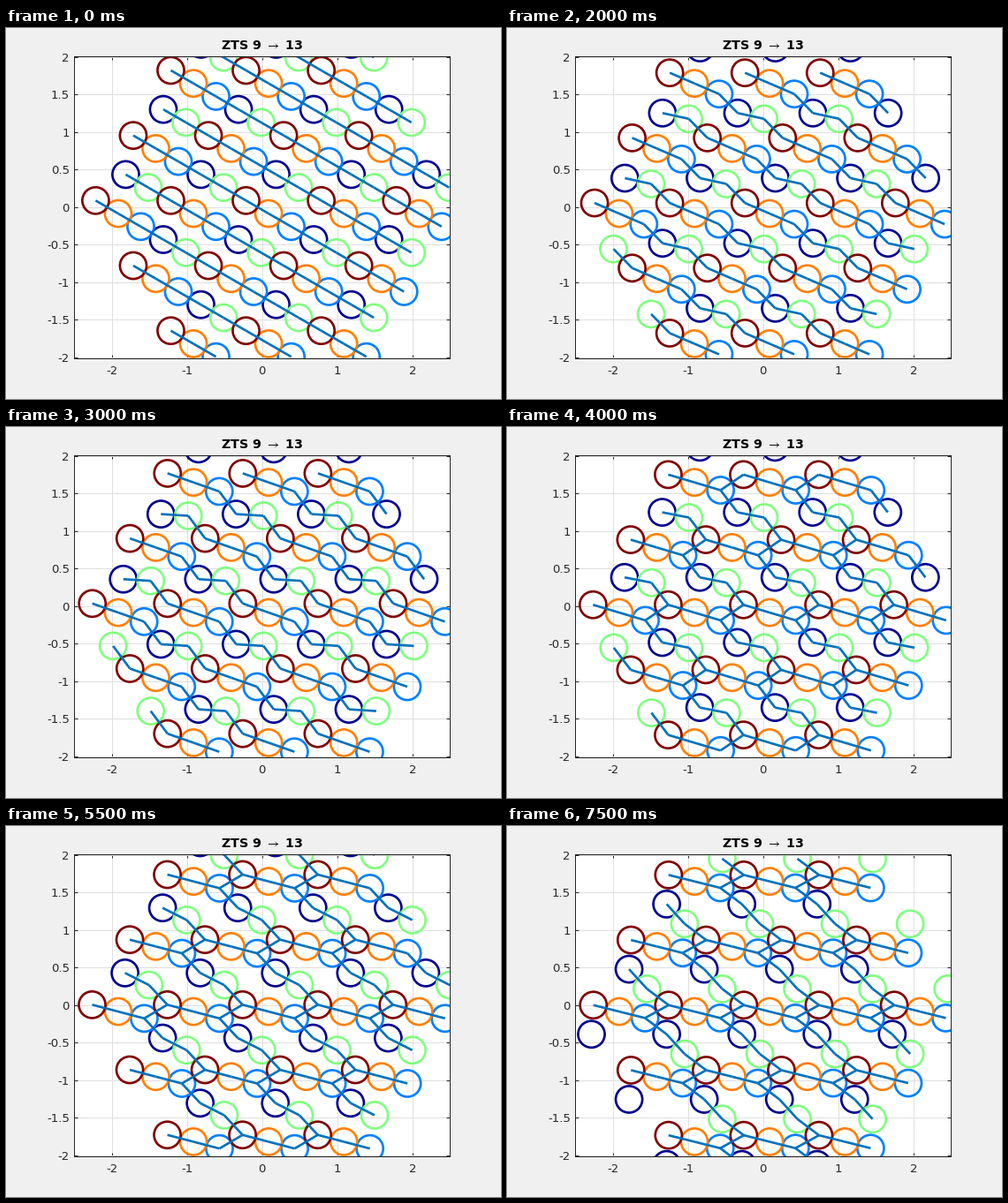
Animation, 560 px wide and 420 px high, one loop 8000 ms. Source, as a matplotlib script:

```python
import numpy as np
import matplotlib.pyplot as plt
from matplotlib.animation import FuncAnimation
from matplotlib.collections import EllipseCollection, LineCollection

plt.rcParams["font.family"] = "DejaVu Sans"
plt.rcParams["mathtext.fontset"] = "stix"

W, H, DPI = 560, 420, 100
FRAMES, STEP = 16, 500
PX = 72 / DPI            # points per pixel
LEFT, RIGHT, TOP, BOTTOM = 77.0, 502.4, 31.6, 373.8
UNIT = (RIGHT - LEFT) / 5
DIAMETER, REACH = 0.354, 0.38
DARK = "#262626"
NAVY, BLUE, GREEN, ORANGE, RED = "#00008f", "#0080ff", "#80ff80", "#ff8000", "#800000"
COLORS = [NAVY, BLUE, GREEN, ORANGE, RED]

# Lattice vectors, the hexagonal patch of 19 cells and the neighbouring images.
A1, A2 = np.array([1, 0]), np.array([0.5, np.sqrt(0.75)])
CELLS = np.array([i * A1 + j * A2
                  for j in range(-2, 3) for i in range(-2, 3) if abs(i + j) <= 2])
NEAR = np.array([i * A1 + j * A2 for i in range(-2, 3) for j in range(-2, 3)])

# Each cell holds a rod of three particles and a pair, both turning on fixed pivots.
SHIFT = np.array([-0.0132, 0])
ROD = np.array([0.1, -A2[1] / 10]) + SHIFT
PAIR = np.array([0.85, -0.6 * A2[1]]) + SHIFT


def heading(degrees):
    a = np.radians(degrees)
    return np.array([np.cos(a), np.sin(a)])


def wrap(p):
    """Periodic image of p closest to the cell centre."""
    images = p + NEAR
    return images[np.argmin(np.hypot(*images.T))]


def particles(t):
    """Particle positions at t seconds, one array per colour."""
    gap = np.interp(t, [0, 1, 3.2, 5, 7.5], [0.3464, 0.349, 0.366, 0.359, 0.354])
    rod = gap * heading(-14 - 16 * np.exp(-(t / 2.835) ** 1.74))
    # The pair swings up until it hits the rod, then turns back.
    pair = gap / 2 * heading(np.interp(t, [0, 3.15, 7.5], [-30, -2.2, -47.7]))
    basis = [PAIR - pair, ROD + rod, PAIR + pair, ROD, ROD - rod]
    return [CELLS + wrap(p) for p in basis]


def bonds(points):
    dist = np.linalg.norm(points[:, None] - points[None], axis=2)
    i, j = np.where(np.triu(dist < REACH, 1))
    return np.stack([points[i], points[j]], axis=1)


fig = plt.figure(figsize=(W / DPI, H / DPI), dpi=DPI, facecolor="#f0f0f0")
ax = fig.add_axes([LEFT / W, 1 - BOTTOM / H, (RIGHT - LEFT) / W, (BOTTOM - TOP) / H])
y_max = (BOTTOM - TOP) / UNIT / 2
ax.set_xlim(-2.5, 2.5)
ax.set_ylim(-y_max, y_max)
ax.set_axisbelow(True)
ax.grid(color="#dfdfdf", linewidth=PX)

ticks_y = np.arange(-2, 2.1, 0.5)
ax.set_xticks(range(-2, 3), [str(v) for v in range(-2, 3)])
ax.set_yticks(ticks_y, [f"{v:g}" for v in ticks_y])
ax.tick_params(direction="in", top=True, right=True, length=4 * PX, width=PX,
               color=DARK, labelcolor=DARK, labelsize=13.3 * PX)
ax.tick_params(axis="x", pad=8.3 * PX)
ax.tick_params(axis="y", pad=5 * PX)
for spine in ax.spines.values():
    spine.set(color=DARK, linewidth=PX)

fig.text(290 / W, 1 - 24 / H, r"ZTS 9 $\rightarrow$ 13", ha="center", va="baseline",
         fontsize=14.3 * PX, fontweight="bold", color="black")

rings = []
for color in COLORS:
    ring = EllipseCollection([DIAMETER], [DIAMETER], [0], units="xy", offsets=CELLS,
                             offset_transform=ax.transData, facecolors="none",
                             edgecolors=color, linewidths=2.67 * PX, zorder=2)
    rings.append(ax.add_collection(ring, autolim=False))
links = ax.add_collection(LineCollection([], colors="#0072bd", linewidths=2.67 * PX,
                                         zorder=2.1), autolim=False)


def draw(n):
    groups = particles(n * STEP / 1000)
    for ring, pts in zip(rings, groups):
        ring.set_offsets(pts)
    links.set_segments(bonds(np.concatenate(groups)))
    return [*rings, links]


anim = FuncAnimation(fig, draw, frames=FRAMES, interval=STEP, repeat=True,
                     repeat_delay=0, blit=False)
plt.show()
```
